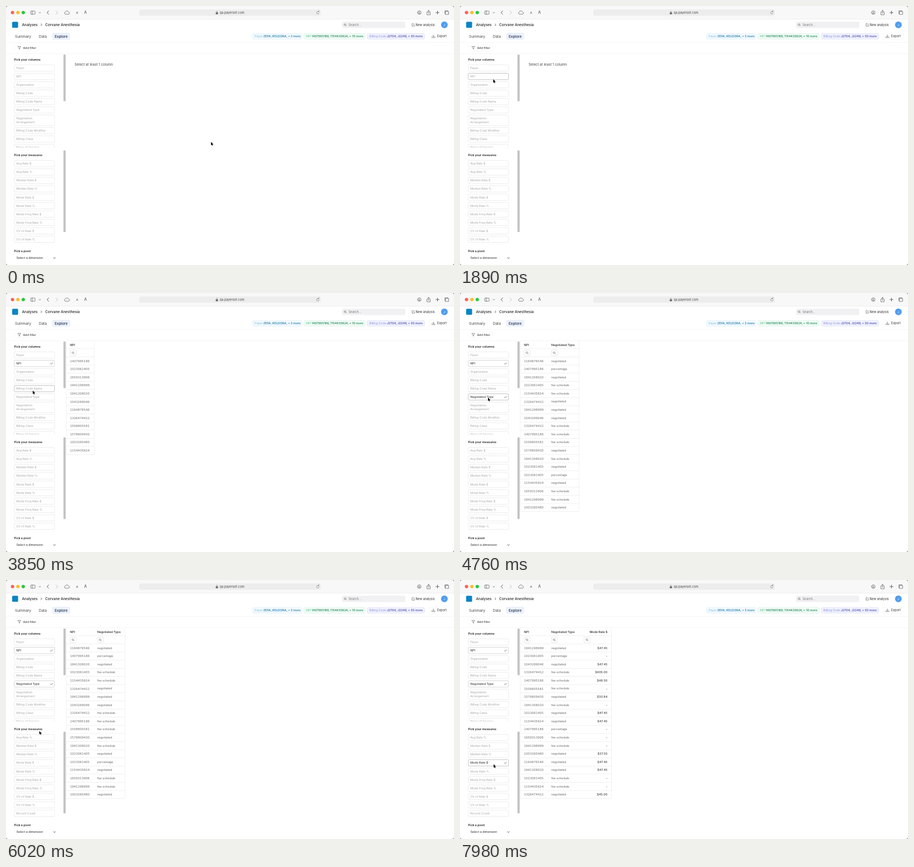
An HTML page for the animation above (8000 ms loop, 800 by 464 pixels).

```html
<!DOCTYPE html>
<html lang="en">
<head>
<meta charset="utf-8">
<title>Explore</title>
<style>
html, body { margin: 0; width: 100%; height: 100%; overflow: hidden; background: #fff; }
svg { display: block; width: 800px; height: 464px; font-family: Inter, "Open Sans", sans-serif; }
text { white-space: pre; }
</style>
</head>
<body>
<svg id="stage" viewBox="0 0 800 464" xmlns="http://www.w3.org/2000/svg">
  <defs>
    <clipPath id="colClip"><rect x="10" y="102" width="90" height="151.5"/></clipPath>
    <clipPath id="meaClip"><rect x="10" y="275" width="90" height="150"/></clipPath>
  </defs>
</svg>
<script>
const LOOP = 8000, STEP = 70;
const svg = document.getElementById('stage');

function el(tag, attrs, parent = svg) {
  const n = document.createElementNS(svg.namespaceURI, tag);
  for (const k in attrs) n.setAttribute(k, attrs[k]);
  parent.appendChild(n);
  return n;
}
const group = (attrs = {}, parent = svg) => el('g', attrs, parent);
const rect = (x, y, w, h, fill, extra = {}, parent = svg) =>
  el('rect', { x, y, width: w, height: h, fill, ...extra }, parent);
const path = (d, stroke = '#444', w = 0.8, parent = svg) =>
  el('path', { d, fill: 'none', stroke, 'stroke-width': w, 'stroke-linecap': 'round', 'stroke-linejoin': 'round' }, parent);
const dot = (cx, cy, r, fill) => el('circle', { cx, cy, r, fill });

// y is the middle of the capitals
function label(str, x, y, size, fill, weight = 400, parent = svg, extra = {}) {
  const t = el('text', { x, y: y + size * 0.364, 'font-size': size, fill, 'font-weight': weight, ...extra }, parent);
  t.textContent = str;
  return t;
}
function magnifier(x, y, color, parent = svg) {
  path(`M${x - 1.9} ${y - 0.4}a1.6 1.6 0 1 0 3.2 0a1.6 1.6 0 1 0 -3.2 0M${x + 0.9} ${y + 0.8}l1.2 1.2`, color, 0.6, parent);
}

function drawBrowser() {
  rect(0, 0, 800, 23.5, '#f8f8f8');
  rect(0, 23, 800, 0.6, '#e6e6e6');
  ['#fe5f57', '#febc2e', '#28c840'].forEach((c, i) => dot(11.6 + i * 9.6, 11.8, 3, c));
  rect(44, 9, 8, 5.8, 'none', { rx: 1.2, stroke: '#555', 'stroke-width': 0.7 });
  path('M46.8 9v5.8', '#555', 0.7);
  path('M58.8 11.3l1.6 1.6l1.6-1.6', '#666');
  path('M76.2 8.8l-3 3l3 3', '#444', 0.9);
  path('M89.2 8.8l3 3l-3 3', '#bbb', 0.9);
  path('M106 14.6a2 2 0 0 1 0-3.9a3 3 0 0 1 5.6 0a2 2 0 0 1 0.4 3.9z', '#555', 0.7);
  label('A', 127, 12, 5, '#444', 400, svg, { 'text-anchor': 'middle' });
  label('A', 142, 11.8, 7, '#444', 400, svg, { 'text-anchor': 'middle' });
  rect(238, 6.2, 324, 11.4, '#ededed', { rx: 3 });
  rect(374.6, 11.6, 4, 3.2, '#666', { rx: 0.6 });
  path('M375.5 11.5v-1a1.1 1.1 0 0 1 2.2 0v1', '#666', 0.6);
  label('qa.payerset.com', 381.5, 12, 5.6, '#4a4a4a');
  path('M558.8 11a2.2 2.2 0 1 0 0.2 1.8M557 9.7h1.8v-1.6', '#666', 0.6);
  path('M734.8 11.8a3.2 3.2 0 1 0 6.4 0a3.2 3.2 0 1 0 -6.4 0M738 10v3.4M736.7 12.2l1.3 1.3l1.3-1.3', '#555', 0.7);
  path('M753.3 10.8h-1.6v5h5.8v-5h-1.6M754.6 13.2v-5.4M753.1 9.2l1.5-1.5l1.5 1.5', '#555', 0.7);
  path('M767.6 11.8h5.8M770.5 8.9v5.8', '#444', 0.8);
  path('M784.6 13.6h-0.8v-5h5.4v0.9M785 9.9h5.4v5.2h-5.4z', '#555', 0.7);
}

function pill(x, w, name, nameX, value, valueX, colors) {
  const [bg, border, light, dark] = colors;
  rect(x, 49.2, w, 10.2, bg, { rx: 2.4, stroke: border, 'stroke-width': 0.5 });
  label(name, nameX, 54.4, 5.3, light);
  label(value, valueX, 54.4, 5.3, dark, 500);
}

function drawHeader() {
  rect(11, 28.2, 10.6, 10.8, '#0b84c6', { rx: 1.6 });
  label('Analyses', 28.6, 33.8, 6.4, '#222', 500);
  path('M62.4 32l1.7 1.7l-1.7 1.7', '#333', 0.8);
  label('Corvane Anesthesia', 70, 33.8, 6.4, '#222', 500);
  rect(600, 28, 113, 11.6, '#f1f1f3', { rx: 2.4 });
  magnifier(605.8, 33.8, '#555');
  label('Search...', 611.6, 33.9, 5.5, '#777');
  path('M727.4 31.6h-2.4v4.6h4.6v-2.4M726.9 34.3l2.6-2.6', '#555', 0.6);
  label('New analysis', 731.4, 33.8, 5.5, '#333');
  dot(782.8, 33.7, 6, '#4f9cf0');
  label('J', 782.8, 33.8, 5, '#fff', 400, svg, { 'text-anchor': 'middle' });

  label('Summary', 16, 54.3, 6.45, '#444');
  label('Data', 58.8, 54.3, 6.45, '#444');
  rect(82.5, 48, 32, 12.6, '#ebf1fb', { rx: 2.4 });
  label('Explore', 87, 54.3, 6.4, '#1e2a4a', 500);
  pill(440.3, 88, 'Payer', 444, 'ZEFA, KELDORA, + 3 more', 459.6, ['#f1f9fe', '#d3eaf8', '#7fbfe0', '#1673a5']);
  pill(531.8, 109.6, 'NPI', 535.8, '1407995186, 1154435824, + 10 more', 545.8, ['#f1fbf6', '#cbecdb', '#5fc093', '#15804f']);
  pill(645, 102.6, 'Billing Code', 649, 'J2704, J2249, + 93 more', 680, ['#f0f1fd', '#d4d8f7', '#8a92de', '#3b3fae']);
  rect(755.5, 48.6, 36.5, 11.6, 'none', { rx: 2.4, stroke: '#f0f0f0', 'stroke-width': 0.5 });
  path('M760.4 55v1.7h5.6v-1.7M763.2 51.6v3.6M761.8 54l1.4 1.4l1.4-1.4', '#555', 0.6);
  label('Export', 770, 54.4, 5.5, '#333');

  rect(0, 65, 800, 0.5, '#ededed');
  rect(15, 69, 44, 11.6, 'none', { rx: 2.4, stroke: '#f0f0f0', 'stroke-width': 0.5 });
  path('M21.2 72.4h5.2l-2 2.6v2.4l-1.2-0.7v-1.7z', '#555', 0.6);
  label('Add filter', 30.4, 75, 5.4, '#333');
  rect(0, 85, 800, 0.5, '#ebebeb');
}

function option(parent, lines, mid) {
  const h = lines.length > 1 ? 18.8 : 11.4;
  const frame = rect(14.8, mid - h / 2, 71.8, h, '#fff', { rx: 1.6, 'stroke-width': 0.6 }, parent);
  const texts = lines.map((s, i) => label(s, 18.2, mid + (i - (lines.length - 1) / 2) * 7.2, 5.35, '#aaa', 400, parent));
  const check = path(`M79.4 ${mid + 0.3}l1.2 1.3l2.4-2.8`, '#444', 0.7, parent);
  return { frame, texts, check, top: mid - h / 2, bottom: mid + h / 2 };
}
function paintOption(o, on, hover) {
  o.frame.setAttribute('stroke', hover ? '#9c9c9c' : on ? '#bdbdbd' : '#d2d2d2');
  o.frame.setAttribute('stroke-dasharray', on || hover ? 'none' : '1.8 0.8');
  o.texts.forEach(t => t.setAttribute('fill', on ? '#222' : '#a6a6a6'));
  o.check.setAttribute('visibility', on ? 'visible' : 'hidden');
}

const NPI = [1407995186, 1023061405, 1659313906, 1841298999, 1841308020, 1043289046,
  1164876546, 1326474412, 1508805581, 1578809430, 1003260480, 1154435824];
const TYPES = { n: 'negotiated', p: 'percentage', f: 'fee schedule' };
const PITCH = 14.59;

// order: one letter per row, a = first id; kinds: one letter per row
function table(right, order, kinds = '', prices = []) {
  const g = group();
  const heads = [['NPI', 114.3]];
  if (kinds) heads.push(['Negotiated Type', 162.9]);
  heads.forEach(([s, x]) => label(s, x, 92.6, 5.3, '#222', 500, g));
  if (prices.length) label('Mode Rate $', 263.4, 92.6, 5.3, '#222', 500, g, { 'text-anchor': 'end' });
  const boxes = heads.map(h => h[1]).concat(prices.length ? [221.4] : []);
  boxes.forEach(x => {
    rect(x + 0.2, 102.2, 10.8, 10, '#fff', { rx: 1.6, stroke: '#d8d8d8', 'stroke-width': 0.6 }, g);
    magnifier(x + 5.5, 107.3, '#666', g);
  });
  const rule = y => rect(107.6, y, right - 107.6, 0.5, '#e0e0e0', {}, g);
  rule(99.6);
  rule(114.2);
  [...order].forEach((c, i) => {
    const y = 121.6 + i * PITCH;
    label(NPI[c.charCodeAt(0) - 97], 114.2, y, 5.4, '#666', 400, g, { style: 'font-variant-numeric: tabular-nums' });
    if (kinds) label(TYPES[kinds[i]], 162.9, y, 5.3, '#666', 400, g);
    if (prices.length)
      label(prices[i] ? '$' + prices[i].toFixed(2) : '-', 263.2, y, 5.4, '#444', 500, g, { 'text-anchor': 'end' });
    rule(114.2 + (i + 1) * PITCH);
  });
  const bottom = 114.2 + order.length * PITCH;
  [right - 0.5, 107.4].forEach(x => rect(x, 85.4, 0.5, bottom - 85.4, '#e6e6e6', {}, g));
  return g;
}

drawBrowser();
drawHeader();

label('Pick your columns', 14.6, 96.3, 5.3, '#222', 600);
const colList = group({ 'clip-path': 'url(#colClip)' });
const columns = [['Payer', 111], ['NPI', 126.2], ['Organization', 141.2], ['Billing Code', 156.2],
  ['Billing Code Name', 171.2], ['Negotiated Type', 186.2], ['Negotiation|Arrangement', 204.8],
  ['Billing Code Modifier', 223.2], ['Billing Class', 238.3], ['Place of Service', 253.4]
].map(([s, y]) => option(colList, s.split('|'), y));

label('Pick your measures', 14.6, 267.4, 5.3, '#222', 600);
const meaList = group({}, group({ 'clip-path': 'url(#meaClip)' }));
const measures = ['Avg Rate $', 'Avg Rate %', 'Median Rate $', 'Median Rate %', 'Mode Rate $', 'Mode Rate %',
  'Mode Freq Rate $', 'Mode Freq Rate %', 'CV of Rate $', 'CV of Rate %', 'Record Count'
].map((s, i) => option(meaList, [s], 282.4 + i * 15.05));

label('Pick a pivot', 14.6, 438.7, 5.3, '#222', 600);
label('Select a dimension', 18.4, 451.4, 5.35, '#222');
path('M84.9 450.8l1.6 1.6l1.6-1.6', '#222', 0.8);

rect(102.6, 87, 3.9, 83.4, '#c2c2c2', { rx: 1 });
const thumb = rect(102.6, 258.8, 3.9, 146.2, '#c2c2c2', { rx: 1 });

const hint = label('Select at least 1 column', 122.4, 104.3, 6.2, '#444');
const tables = [
  table(158, 'abcdefghijkl'),
  table(212.8, 'gaeblhdfhaijebblcdk', 'npnffnnnfffnfnpnffn'),
  table(270.8, 'dbfhaijeblacdkgeblh', 'npnfffnfnnpffnnnffn',
    [47.45, 0, 47.45, 405, 48.5, 0, 30.84, 0, 47.45, 47.45, 0, 0, 0, 37.3, 47.45, 47.45, 0, 0, 45])
];

// window corners
[[0, 0, 1, 1], [800, 0, -1, 1], [0, 464, 1, -1], [800, 464, -1, -1]].forEach(([x, y, a, b]) =>
  el('path', { d: 'M0 0H4A4 4 0 0 0 0 4Z', fill: '#8d8d8d', transform: `translate(${x} ${y}) scale(${a} ${b})` }));

const cursor = el('path', {
  d: 'M0 0V6.2L1.4 4.9L2.4 7.1L3.4 6.7L2.5 4.5H4.4Z',
  fill: '#000', stroke: '#fff', 'stroke-width': 0.5, 'paint-order': 'stroke'
});

// time, x, y of the pointer
const route = [[0, 366, 243.4], [490, 352, 239], [630, 352, 239], [840, 318, 231], [1050, 198, 206],
  [1260, 123.6, 187], [1470, 98, 166], [1750, 66, 138], [1960, 56, 128], [2030, 56, 128], [2240, 51.8, 125],
  [3430, 51.8, 125], [3640, 49, 148], [3850, 47.8, 174.8], [4060, 50, 187.4], [4760, 50, 187.4],
  [4970, 51, 193], [5180, 51, 193], [5460, 56, 240], [5740, 59.5, 270.4], [6230, 59.5, 270.4],
  [6510, 64, 313], [6650, 64, 313], [6720, 64.4, 313.8], [6860, 64.4, 313.8], [7140, 60, 330]];

function along(t) {
  const i = route.findIndex(p => p[0] > t);
  if (i < 0) return route[route.length - 1].slice(1);
  const [a, b] = [route[i - 1], route[i]];
  const k = (t - a[0]) / (b[0] - a[0]);
  return [a[1] + (b[1] - a[1]) * k, a[2] + (b[2] - a[2]) * k];
}
const ramp = (t, a, b) => {
  const k = Math.min(1, Math.max(0, (t - a) / (b - a)));
  return k * k * (3 - 2 * k);
};

function render(time) {
  const t = Math.floor((time % LOOP) / STEP) * STEP;
  const [x, y] = along(t);
  const scroll = ramp(t, 5670, 6020);
  const shift = 15.05 * scroll;
  const over = (o, dy) => x > 14.5 && x < 87 && y > o.top - dy && y < o.bottom - dy;

  cursor.setAttribute('transform', `translate(${x} ${y})`);
  meaList.setAttribute('transform', `translate(0 ${-shift})`);
  thumb.setAttribute('y', 258.8 + 13 * scroll);
  columns.forEach((o, i) => paintOption(o, (i === 1 && t >= 2940) || (i === 5 && t >= 4130), over(o, 0)));
  measures.forEach((o, i) => paintOption(o, i === 4 && t >= 7210, y > 275 && over(o, shift)));

  const shown = [3220, 4270, 7910].filter(s => t >= s).length - 1;
  tables.forEach((g, i) => g.setAttribute('display', i === shown ? 'inline' : 'none'));
  hint.setAttribute('display', t < 2940 ? 'inline' : 'none');
}

const start = performance.now();
function tick() {
  render(performance.now() - start);
  requestAnimationFrame(tick);
}
render(0);
requestAnimationFrame(tick);
</script>
</body>
</html>
```
